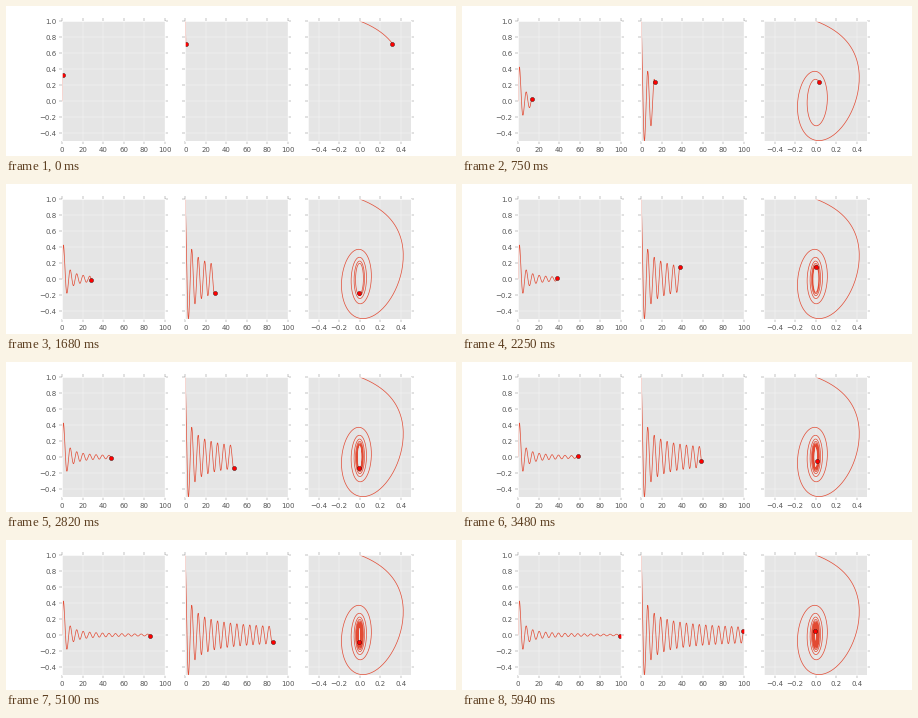
A matplotlib script that plays this animation: 450x150 px, repeating every 5.97 s.

```python
import numpy as np
import matplotlib.pyplot as plt
from matplotlib.animation import FuncAnimation

FRAMES, INTERVAL = 199, 30
STEP = 10  # samples per frame
DT = 0.05

GREY = "#555555"
plt.rcParams.update({
    "font.family": "DejaVu Sans",
    "font.size": 10,
    "axes.facecolor": "#E5E5E5",
    "axes.edgecolor": "white",
    "axes.linewidth": 1.0,
    "axes.grid": True,
    "axes.axisbelow": True,
    "grid.color": "white",
    "grid.linestyle": "-",
    "grid.linewidth": 0.5,
    "xtick.top": True,
    "ytick.right": True,
})
for axis in ("xtick", "ytick"):
    plt.rcParams.update({
        f"{axis}.color": GREY,
        f"{axis}.direction": "out",
        f"{axis}.labelsize": 10,
        f"{axis}.major.size": 4,
        f"{axis}.major.width": 0.5,
        f"{axis}.major.pad": 4,
    })

t = np.arange(FRAMES * STEP + 1) * DT
x = np.sin(t) / (t + 1)
y = np.cos(t) / np.sqrt(t + 1)
curves = [(t, x), (t, y), (x, y)]

fig, axes = plt.subplots(1, 3, sharey=True, figsize=(9, 3), dpi=50,
                         facecolor="white")
fig.subplots_adjust(left=0.125, right=0.9, bottom=0.1, top=0.9, wspace=0.2)

for ax in axes[:2]:
    ax.set_xlim(0, 100)
    ax.set_xticks(np.arange(0, 101, 20))
axes[2].set_xlim(-0.5, 0.5)
axes[2].set_xticks(np.arange(-2, 3) / 5)
axes[0].set_ylim(-0.5, 1)
axes[0].set_yticks(np.arange(-2, 6) / 5)

lines = [ax.plot([], [], color="#E24A33", lw=1)[0] for ax in axes]
dots = [ax.plot([], [], "o", ms=6, mfc="red", mec="black", mew=0.5)[0]
        for ax in axes]


def update(frame):
    end = (frame + 1) * STEP
    for (u, v), line, dot in zip(curves, lines, dots):
        line.set_data(u[:end + 1], v[:end + 1])
        dot.set_data([u[end]], [v[end]])
    return lines + dots


anim = FuncAnimation(fig, update, frames=FRAMES, interval=INTERVAL,
                     init_func=lambda: update(0), repeat=True, repeat_delay=0)
plt.show()
```
